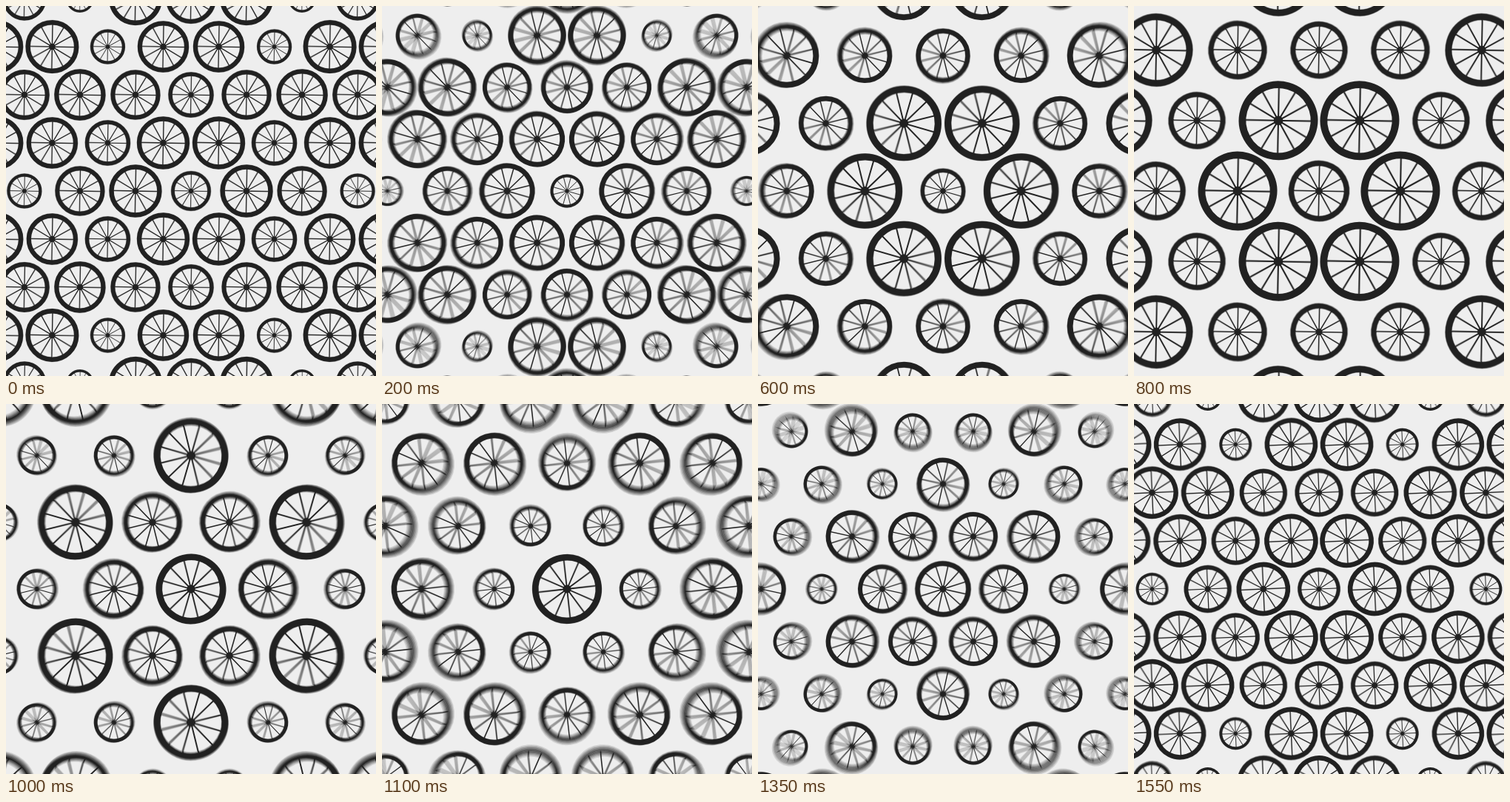
Write an HTML page with a canvas that moves like this. It is 500x500 px and loops after 1.6 s.

```html
<!DOCTYPE html>
<html>
<head>
<meta charset="utf-8">
<title>Rolling wheels</title>
<style>
  html, body { margin: 0; width: 100%; height: 100%; overflow: hidden; background: #eee; }
  canvas { display: block; }
</style>
</head>
<body>
<canvas id="stage" width="500" height="500"></canvas>
<script>
const SIZE = 500, LOOP = 1600, STEP = 50, SHUTTER = 30, SAMPLES = 8;
const TAU = Math.PI * 2;
const PAPER = '#eee', INK = '#212121';

const stage = document.getElementById('stage').getContext('2d');
const layer = document.createElement('canvas');
layer.width = layer.height = SIZE;
const ctx = layer.getContext('2d');

function wheel(x, y, r, angle) {
  ctx.save();
  ctx.translate(x, y);
  ctx.rotate(angle);
  ctx.lineWidth = r * 0.2;
  ctx.beginPath();
  ctx.arc(0, 0, r, 0, TAU);
  ctx.stroke();
  ctx.lineWidth = r * 0.042;
  ctx.beginPath();
  for (let i = 0; i < 12; i++) {
    ctx.moveTo(0, 0);
    ctx.lineTo(r * Math.cos(i * TAU / 12), r * Math.sin(i * TAU / 12));
  }
  ctx.stroke();
  ctx.beginPath();
  ctx.arc(0, 0, r * 0.13, 0, TAU);
  ctx.fill();
  ctx.restore();
}

// Breathing hexagonal grid; wheel size follows a ripple spreading from the centre.
function drawGrid(ms) {
  const phase = TAU * ms / LOOP;
  const gap = 92.5 - 17.5 * Math.cos(phase);
  ctx.fillStyle = PAPER;
  ctx.fillRect(0, 0, SIZE, SIZE);
  ctx.fillStyle = ctx.strokeStyle = INK;
  for (let row = -5; row <= 5; row++) {
    for (let col = -5; col <= 5; col++) {
      const x = gap * (col + (row & 1) / 2);
      const y = gap * row * Math.sqrt(3) / 2;
      const ripple = Math.sin(0.1 * Math.hypot(x, y) - phase);
      wheel(SIZE / 2 + x, SIZE / 2 + y, gap * (0.334 + 0.1075 * ripple), phase / 3);
    }
  }
}

// Motion blur: running average of several moments within the shutter time.
function render(ms) {
  for (let i = 0; i < SAMPLES; i++) {
    drawGrid(ms + SHUTTER * (i + 0.5) / SAMPLES);
    stage.globalAlpha = 1 / (i + 1);
    stage.drawImage(layer, 0, 0);
  }
}

let shown = -1;
function tick() {
  const ms = Math.floor(performance.now() % LOOP / STEP) * STEP;
  if (ms !== shown) render(shown = ms);
  requestAnimationFrame(tick);
}
tick();
</script>
</body>
</html>
```
